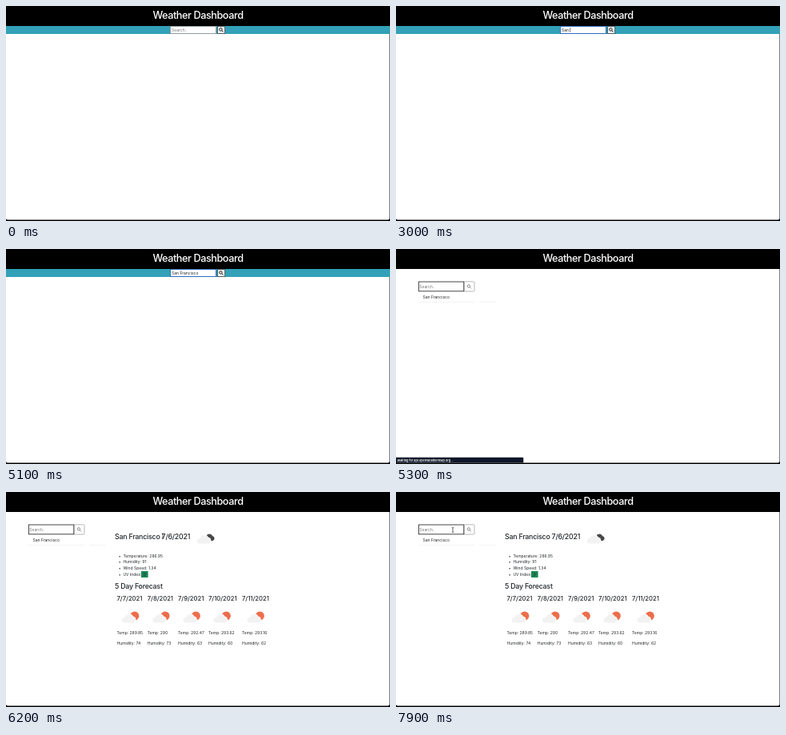
Write an HTML page that moves like this. It is 480x269 px and loops after 8 s.

```html
<!DOCTYPE html>
<html lang="en">
<head>
<meta charset="utf-8">
<title>Weather Dashboard</title>
<style>
  html, body { margin: 0; width: 100%; height: 100%; overflow: hidden; background: #fff; }
  svg { display: block; width: 480px; height: 269px; }
  text { font: 5px Inter, Roboto, sans-serif; fill: #212529; white-space: pre; }
  .title { font-size: 12.7px; font-weight: 500; letter-spacing: -.035em; fill: #fff; text-anchor: middle; }
  .heading { font-size: 8.8px; font-weight: 500; letter-spacing: -.025em; }
  .date { font-size: 7.65px; font-weight: 500; }
  .hint { fill: #757575; }
  .status { font-size: 3.75px; font-weight: 600; fill: #fff; }
</style>
</head>
<body>
<svg viewBox="0 0 480 269">
  <defs>
    <g id="cloud">
      <path d="M3.2 14.5a3.2 3.2 0 0 1 0-6.4h.3a5.4 5.4 0 0 1 10-.8 3.7 3.7 0 0 1 .5 7.2z"/>
    </g>
    <g id="lens" fill="none">
      <circle cx="-.6" cy="-.6" r="1.7"/>
      <path d="M.7 .7 2.4 2.4"/>
    </g>
    <g id="sunny">
      <circle cx="15.8" cy="6" r="5.5" fill="#ec6e4c"/>
      <use href="#cloud" fill="#f2f2f2" stroke="#fff" stroke-width="1.6" paint-order="stroke"/>
    </g>
  </defs>

  <rect width="480" height="269"/>
  <path d="M0 25H479.5V265.5a2 2 0 0 1-2 2H2a2 2 0 0 1-2-2z" fill="#fff"/>
  <text class="title" x="240" y="16.4">Weather Dashboard</text>

  <g id="home">
    <rect y="25" width="480" height="10" fill="#33a1b7"/>
    <rect id="field" x="205.5" y="25.5" width="57" height="9" fill="#fff"/>
    <text id="query" x="207" y="31.8"></text>
    <path id="caret" stroke="#222" stroke-width=".6"/>
    <rect x="264.5" y="25.7" width="9.2" height="8.8" fill="#f4f4f4" stroke="#333" stroke-width=".7"/>
    <use href="#lens" x="269" y="30" stroke="#111" stroke-width="1"/>
  </g>

  <g id="results">
    <rect x="85" y="40.8" width="13" height="12.2" rx="1.3" fill="#fff" stroke="#888" stroke-width=".6"/>
    <rect x="28.4" y="41" width="56.4" height="11.8" fill="#fff" stroke="#333" stroke-width=".9"/>
    <use href="#lens" x="91.5" y="47" stroke="#444" stroke-width=".6"/>
    <text class="hint" x="29.3" y="48.8">Search..</text>
    <text x="33.5" y="61.8">San Francisco</text>
    <path d="M28 66.5H98M104 66.5H125" stroke="#ececec" stroke-width=".6"/>
    <g id="weather">
      <text class="heading" x="136" y="59.2">San Francisco 7/6/2021</text>
      <use href="#cloud" transform="translate(247 49) scale(.82)" fill="#48484a"/>
      <use href="#cloud" x="239" y="50" fill="#f2f2f2" stroke="#fff" stroke-width="1.4" paint-order="stroke"/>
      <rect x="169" y="99" width="8.6" height="8" fill="#198754"/>
      <text x="171.8" y="104.9">0</text>
      <text class="heading" x="136" y="121.2">5 Day Forecast</text>
    </g>
  </g>

  <g id="status">
    <path d="M0 260.7H158a1.3 1.3 0 0 1 1.3 1.3V267.5H0z" fill="#0e1729"/>
    <text class="status" x="1.6" y="265.6">Waiting for api.openweathermap.org...</text>
  </g>

  <path id="arrow" d="M0 0V5.6L1.3 4.4 2.2 6.4 3.1 6 2.2 4.1H4z" stroke="#fff" stroke-width=".5"/>
  <path id="beam" d="M-1.2-3Q0-3 0-2.3Q0-3 1.2-3M0-2.3V2.3M-1.2 3Q0 3 0 2.3Q0 3 1.2 3" fill="none" stroke="#222" stroke-width=".7"/>
</svg>
<script>
const $ = id => document.getElementById(id);
const LOOP = 8000, STEP = 100;
const CITY = "San Francisco";
const KEY_TIMES = [2500, 2700, 2900, 3000, 3400, 3600, 3700, 3800, 4000, 4100, 4300, 4500, 4600];

// Pointer paths: [time, x, y]
const ENTER = [[200, 328, 262], [400, 298, 190], [600, 262, 112], [800, 235, 62],
  [1000, 219, 34], [1100, 219, 31.5], [1400, 220.5, 30]];
const BROWSE = [[5700, 218, 31], [5900, 213, 38], [6200, 196, 55], [6300, 140, 58], [6400, 95, 60.5],
  [6600, 95, 60.5], [6700, 101, 60.5], [6800, 101, 60.5], [6900, 107, 60.5], [7000, 110, 60],
  [7200, 72, 60], [7400, 36, 60], [7500, 45, 57], [7700, 70, 48.5], [7900, 71, 47.5]];

function addText(x, y, content, className = "") {
  const node = document.createElementNS("http://www.w3.org/2000/svg", "text");
  node.setAttribute("x", x);
  node.setAttribute("y", y);
  node.setAttribute("class", className);
  node.textContent = content;
  $("weather").append(node);
}

function buildWeather() {
  ["Temperature: 286.95", "Humidity: 91", "Wind Speed: 1.34", "UV Index:"].forEach((line, i) => {
    const y = 81.7 + i * 7.75;
    addText(146.4, y, line);
    addText(140.8, y, "•");
  });
  const days = [
    [138.5, 289.85, 74], [176.7, 290, 73], [215, 292.47, 63], [253, 293.62, 60], [295, 293.16, 62]
  ];
  days.forEach(([x, temp, humidity], i) => {
    addText(x, 135.7, `7/${7 + i}/2021`, "date");
    addText(x, 178.3, `Temp: ${temp}`);
    addText(x, 191.2, `Humidity: ${humidity}`);
    const icon = document.createElementNS("http://www.w3.org/2000/svg", "use");
    icon.setAttribute("href", "#sunny");
    icon.setAttribute("x", x + 6.5);
    icon.setAttribute("y", 149);
    $("weather").append(icon);
  });
}

function show(id, visible) {
  $(id).style.display = visible ? "" : "none";
}

function along(path, t) {
  const next = path.findIndex(p => p[0] > t);
  if (next < 0) return path[path.length - 1].slice(1);
  const [t0, x0, y0] = path[next - 1], [t1, x1, y1] = path[next];
  const k = (t - t0) / (t1 - t0);
  return [x0 + (x1 - x0) * k, y0 + (y1 - y0) * k];
}

function drawPointer(t) {
  const entering = t >= 200 && t < 2500, browsing = t >= 5700;
  show("arrow", false);
  show("beam", false);
  if (!entering && !browsing) return;
  const [x, y] = along(entering ? ENTER : BROWSE, t);
  const inside = (left, top, right, bottom) => x > left && x < right && y > top && y < bottom;
  const overText = entering
    ? inside(205, 25, 263, 33.5)
    : inside(136, 50, 233, 62) || inside(28, 41, 85, 53) || inside(33, 56, 68, 64);
  const id = overText ? "beam" : "arrow";
  $(id).setAttribute("transform", `translate(${x} ${y})`);
  show(id, true);
}

function drawSearch(t) {
  const typed = CITY.slice(0, KEY_TIMES.filter(k => k <= t).length);
  const focused = t >= 1500;
  const query = $("query");
  query.textContent = typed || "Search..";
  query.setAttribute("class", typed ? "" : "hint");
  $("field").setAttribute("stroke", focused ? "#2f6fc4" : "#8a8a8a");
  $("field").setAttribute("stroke-width", focused ? 1 : .7);
  const caretOn = (t >= 1500 && t < 2000) || (t >= 2500 && t < 5100);
  show("caret", caretOn);
  const x = 207.2 + (typed ? query.getComputedTextLength() : 0);
  $("caret").setAttribute("d", `M${x} 27.2V32.8`);
}

function render(time) {
  const t = Math.floor(time % LOOP / STEP) * STEP;
  const searched = t >= 5300;
  show("home", !searched);
  show("results", searched);
  show("weather", t >= 5400);
  show("status", searched && t < 5700);
  if (!searched) drawSearch(t);
  drawPointer(t);
}

buildWeather();
const start = performance.now();
function tick() {
  render(performance.now() - start);
  requestAnimationFrame(tick);
}
tick();
</script>
</body>
</html>
```
